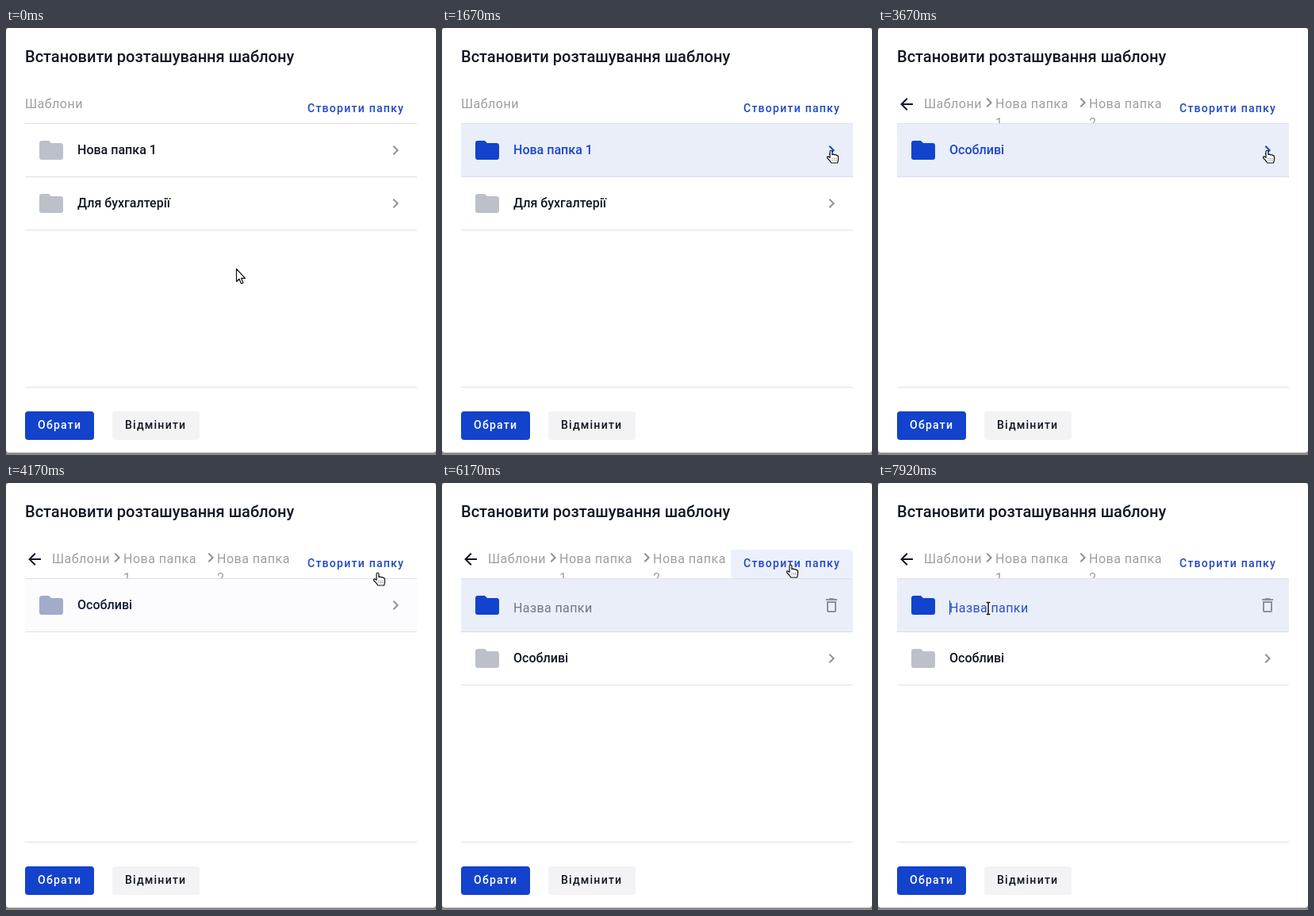
Animation, 542 px wide and 538 px high, one loop 8000 ms. Source, as an HTML page:

```html
<!DOCTYPE html>
<html lang="uk">
<head>
<meta charset="utf-8">
<title>Вибір папки</title>
<style>
html, body { margin: 0; width: 100%; height: 100%; overflow: hidden; background: #8b8b8b; }
svg { display: block; width: 542px; height: 538px; }
text { font-family: Roboto, "Noto Sans", sans-serif; font-size: 16px; white-space: pre; }
.title { font-size: 20px; font-weight: 500; fill: #101622; }
.btn { font-size: 14px; font-weight: 500; letter-spacing: 1.25px; }
.label { font-weight: 500; }
.crumb { letter-spacing: .5px; fill: #9e9e9e; }
.field { letter-spacing: .4px; }
.cursor { fill: #fff; stroke: #111; stroke-width: 1.2; stroke-linejoin: round; }
</style>
</head>
<body>
<svg viewBox="0 0 542 538">
  <defs>
    <clipPath id="crumbClip"><rect x="24" y="80" width="340" height="40"/></clipPath>
    <path id="folder" transform="scale(1.5)" d="M10 4H4C2.89 4 2 4.89 2 6V18A2 2 0 0 0 4 20H20A2 2 0 0 0 22 18V8C22 6.89 21.1 6 20 6H12Z"/>
    <path id="chevron" d="M8.59 16.58L13.17 12L8.59 7.41L10 6L16 12L10 18Z"/>
    <path id="back" d="M20 11V13H8L13.5 18.5L12.08 19.92L4.16 12L12.08 4.08L13.5 5.5L8 11Z"/>
    <path id="bin" d="M6 19A2 2 0 0 0 8 21H16A2 2 0 0 0 18 19V7H6ZM8 9V19H16V9ZM15.5 4L14.5 3H9.5L8.5 4H5V6H19V4Z" fill-rule="evenodd"/>
    <path id="arrow" class="cursor" d="M.5 .5V16.5L4 13.2L6.5 19L9 18L6.5 12.3H11.5Z"/>
    <g id="hand">
      <path class="cursor" d="M-1 1.7A1.4 1.4 0 0 1 1.9 1.7V5.6Q4 4.7 4.8 6Q6.8 5.2 7.4 6.6Q9.5 6.3 9.5 8.6V11.5Q9.4 13.5 8.4 16H.8Q-1 12.8 -4.2 10Q-5 8.3 -3.6 7.9Q-2.4 7.8 -1 9.4Z"/>
      <path d="M2 10V13M4.4 10V13M6.8 10V13" stroke="#333" stroke-width=".8" stroke-dasharray="1 1"/>
    </g>
    <g id="beam" fill="none">
      <path d="M-2.5 -7.5H2.5M0 -7.5V7.5M-2.5 7.5H2.5" stroke="#fff" stroke-width="3.4" stroke-linecap="square"/>
      <path d="M-2.5 -7.5H2.5M0 -7.5V7.5M-2.5 7.5H2.5" stroke="#111" stroke-width="1.5"/>
    </g>
  </defs>
  <rect width="542" height="538" fill="#8b8b8b"/>
  <rect width="542" height="535" rx="4" fill="#fff"/>
  <text class="title" x="24" y="43">Встановити розташування шаблону</text>
  <rect id="createBg" x="364" y="84" width="154" height="36" rx="4" fill="#1343cc"/>
  <text class="btn" x="380" y="106" fill="#1f48c4">Створити папку</text>
  <g id="scene"></g>
  <path d="M24 120.5H518M24 452.5H518" stroke="#e0e0e0"/>
  <rect x="24" y="483" width="87" height="36" rx="4" fill="#1343cc"/>
  <text class="btn" x="40" y="505" fill="#fff">Обрати</text>
  <rect x="134" y="483" width="110" height="36" rx="4" fill="#f3f3f5"/>
  <text class="btn" x="150" y="505" fill="#101622">Відмінити</text>
  <use id="pointer"/>
</svg>
<script>
const LOOP = 8000, TICK = 1000 / 12;
const BLUE = [19, 67, 204], DARK = [16, 22, 34], GREY = [188, 193, 201];
const FIELD = 'Назва папки';

// start time, breadcrumb depth, rows
const views = [
  [0, 0, ['Нова папка 1', 'Для бухгалтерії']],
  [1915, 1, ['Нова папка 2', 'Новіше нового']],
  [3165, 2, ['Особливі']],
  [5665, 2, [FIELD, 'Особливі']]
];
// hovered spans per row
const hovers = [
  [[1200, 4083], [5560, 9000]],
  [[950, 1200], [6700, 6910]]
];
// time, x, y of the hot spot
const path = [
  [0, 290, 303], [167, 290, 303], [750, 335, 282], [917, 385, 255],
  [1167, 451, 180], [1333, 487, 158], [1500, 490, 154], [3830, 490, 154],
  [4167, 468, 113], [4417, 439, 103], [6400, 439, 103], [6583, 390, 150],
  [6750, 300, 194], [6900, 210, 188], [7167, 138.5, 158], [LOOP, 138.5, 158]
];
const pointers = [[0, 'arrow'], [950, 'hand'], [6950, 'beam']];
const createTint = [[0, 0], [4240, .04], [5575, .08], [6330, .04], [6490, 0]];
const FOCUS = 7245;

const $ = id => document.getElementById(id);
const clamp = v => Math.max(0, Math.min(1, v));
const latest = (list, t) => list.filter(s => s[0] <= t).pop();
const mix = (a, b, k) => `rgb(${a.map((v, i) => Math.round(v + (b[i] - v) * k))})`;
const icon = (id, x, y, fill) => `<g transform="translate(${x} ${y})"><use href="#${id}" fill="${fill}"/></g>`;
const text = (cls, x, y, s, fill) => `<text class="${cls}" x="${x}" y="${y}"${fill ? ` fill="${fill}"` : ''}>${s}</text>`;

// hover strength with a short fade in and out
const glow = (spans, t) => Math.max(...spans.map(([on, off]) =>
  Math.min(clamp((t - on) / 100), 1 - clamp((t - off) / 100))));

function place(t) {
  const i = path.findIndex(p => p[0] > t);
  const [t0, x0, y0] = path[i - 1], [t1, x1, y1] = path[i];
  const k = (t - t0) / (t1 - t0);
  return [Math.round(x0 + (x1 - x0) * k), Math.round(y0 + (y1 - y0) * k)];
}

function crumbs(depth) {
  if (!depth) return text('crumb', 24, 101, 'Шаблони');
  let s = icon('back', 24, 84, '#101622') + text('crumb', 58, 101, 'Шаблони') + icon('chevron', 128, 82, '#8f8f8f');
  if (depth === 1) return s + text('crumb', 148, 101, 'Нова папка 1');
  s += icon('chevron', 246, 82, '#8f8f8f');
  [148, 266].forEach((x, i) => {
    s += text('crumb', x, 101, 'Нова папка') + text('crumb', x, 125, i + 1);
  });
  return s;
}

function row(name, i, t, [px, py]) {
  const y = 121 + i * 67, k = glow(hovers[i], t);
  const onChevron = k > .5 && px > 480 && Math.abs(py - y - 33) < 14;
  let s = `<rect x="24" y="${y}" width="494" height="66" fill="#e9eef9" opacity="${k}"/>`;
  s += `<path d="M24 ${y + 66.5}H518" stroke="${mix([224, 224, 224], [216, 221, 235], k)}"/>`;
  s += icon('folder', 39, y + 15, mix(GREY, BLUE, k));
  if (name === FIELD) {
    const focused = t >= FOCUS;
    s += text('field', 90, y + 42, name, focused ? '#2a4fc4' : '#717684');
    if (focused && (t - FOCUS) % 1000 < 500 || t > 7800)
      s += `<rect x="90" y="${y + 27}" width="1" height="18" fill="#1343cc"/>`;
    return s + icon('bin', 479, y + 21, '#8d919b');
  }
  s += text('label', 90, y + 38, name, mix(DARK, [31, 72, 196], k));
  return s + icon('chevron', 479, y + 21, onChevron ? mix(BLUE, BLUE, 0) : '#929292');
}

function draw(t) {
  const [, depth, rows] = latest(views, t), pos = place(t);
  $('scene').innerHTML = `<g clip-path="url(#crumbClip)">${crumbs(depth)}</g>` +
    rows.map((name, i) => row(name, i, t, pos)).join('');
  $('createBg').setAttribute('opacity', latest(createTint, t)[1]);
  $('pointer').setAttribute('href', '#' + latest(pointers, t)[1]);
  $('pointer').setAttribute('transform', `translate(${pos})`);
}

let shown = -1;
const begin = performance.now();
function frame(now) {
  const t = Math.max(0, now - begin) % LOOP;
  const n = Math.min(95, Math.floor((t + 3) / TICK));
  if (n !== shown) draw((shown = n) * TICK);
  requestAnimationFrame(frame);
}
frame(begin);
</script>
</body>
</html>
```
